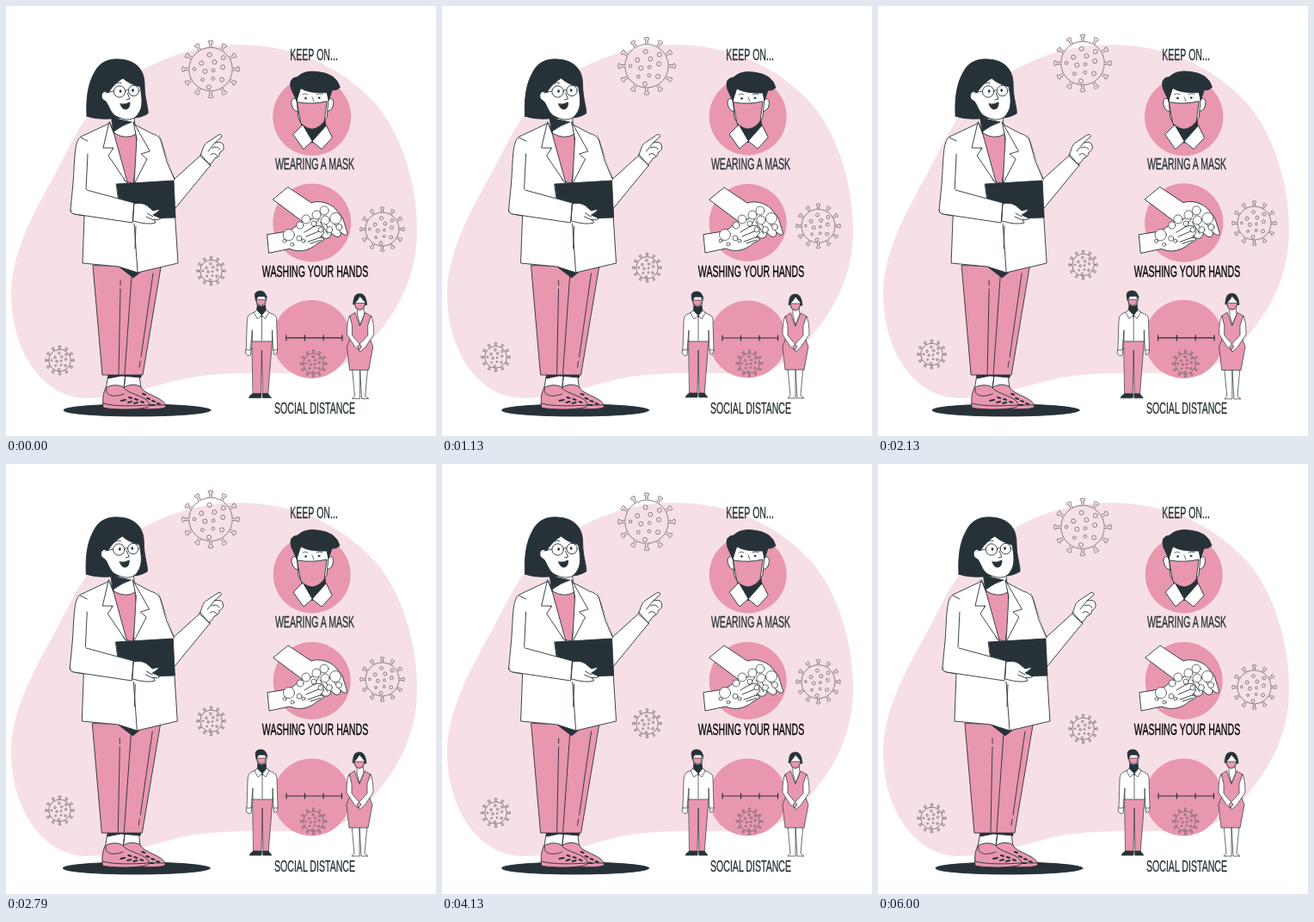
Write an HTML page that moves like this. It is 500 by 500 pixels and loops after 6040 ms.

```html
<!DOCTYPE html>
<html lang="en">
<head>
<meta charset="utf-8">
<title>Keep on</title>
<style>
html, body { margin: 0; width: 100%; height: 100%; overflow: hidden; background: #fff; }
svg { display: block; width: 100vw; height: 100vh; }
.art { stroke: #263238; stroke-width: .9; stroke-linejoin: round; stroke-linecap: round; fill: none; }
.w { fill: #fff; }
.p { fill: #e897ae; }
.d { fill: #263238; }
.disc { fill: #e897ae; stroke: none; }
.fine { stroke-width: .7; }
.virus { fill: none; stroke: #756b70; stroke-width: .85; }
.virus * { vector-effect: non-scaling-stroke; }
.beat { transform-box: fill-box; transform-origin: center; }
text { font: 18px "Liberation Sans", Arial, sans-serif; text-anchor: middle; stroke-width: .35; }
</style>
</head>
<body>
<svg viewBox="0 0 500 500">
<path fill="#f6e0e6" d="M270 45C332 45 388 68 430 114C462 152 478 210 478 262C478 318 452 358 428 386C404 420 378 428 320 427C270 426 235 427 200 435C160 445 130 456 92 456C42 455 6 400 6 335C6 285 35 235 59 192C80 152 92 122 127 95C170 62 220 45 270 45Z"/>

<g id="viruses"></g>

<g id="woman" class="art">
  <ellipse class="d" cx="152.500" cy="470" rx="85.500" ry="7"/>
  <!-- shoes and trousers -->
  <path class="w" d="M119 428L116 446L136 452L139 428ZM139 428L137 446L157 446L155 428Z"/>
  <path class="d" d="M119 429L119 433L134 430L157 432L157 429Z"/>
  <path class="p" d="M137 444C140 440 152 439 157 443C160 452 185 455 186 466C184 470 150 469 139 467Z"/>
  <path class="p" d="M116 444C122 440 131 440 136 443C142 452 165 453 167 464C168 470 123 470 113 467C112 457 113 450 116 444Z"/>
  <path d="M113 462C126 466 150 465 167 464M167 464L186 464M117 445C115 453 125 456 137 451"/>
  <path stroke-width="2" d="M134 459l5-1M142 461l4-1M149 462l4-1M143 455l3 1M150 457l3 1M157 460l3 1M164 456l3 1M170 459l3 1M176 462l3 1M159 451l3 1M168 464l4 0"/>
  <path class="p" d="M101 302L112 429H159L180 304Z"/>
  <path d="M146 315L138 428M133 319V325M133 329L131 428M171 311L157 408M156 413L155 420"/>
  <path class="d" d="M130 302L148 316L158 308V300Z"/>
  <!-- coat -->
  <path class="w" d="M178 151C184 165 188 184 196 201L227 173L238 185L197 235L184 230Z"/>
  <path class="w" stroke="none" d="M148 137L169 148L178 151L190 190L197 234L180 240L150 200Z"/>
  <path class="w" d="M196 202L190 206L196 235L200 299L153 310L131 303L89 299L91 244L80 242Q75 241 75 237L78 206C80 180 79 157 87 152L121 136L126 148L148 137"/>
  <path class="w" stroke="none" d="M148 137L169 148L178 151L196 202L190 230L130 210Z"/>
  <path d="M148 137L169 148Q177 150 180 156L187 181L196 202M149 253L153 309M95 172L93 214M87 153L95 157M151 256L150 282"/>
  <path class="p" d="M126 148L151 148L153 173L148 207L138 203L124 168Z"/>
  <path class="w" d="M123 129L126 148Q140 156 151 149L149 129Z"/>
  <path class="d" d="M123 130L146 135Q136 138 125 146Z"/>
  <path class="w" d="M120 135L113 165L125 165L119 174L142 208L126 150ZM148 135L152 154L149 207L164 178L157 172L167 169Z"/>
  <!-- pointing hand -->
  <path class="w" d="M226 174C229 167 229 161 235 158L247 150Q251 148 251 152L243 159Q253 157 253 163Q254 168 249 170Q248 176 243 177Q240 183 237 184Z"/>
  <path d="M235 169L243 159M240 165Q246 162 249 167M238 173Q243 169 246 175M226 172L238 186"/>
  <!-- folder and left hand -->
  <path class="d" d="M128.500 207L195 203L197 246L134 248Z"/>
  <path class="w" stroke="none" d="M76 238C80 230 84 220 93 213L149 229L148 252L80 242Q75 241 76 238Z"/>
  <path class="w" d="M149 230Q158 228 164 232L171 238L179 236Q177 240 171 243L180 247Q176 250 172 248L174 252Q165 255 148 250Z"/>
  <path d="M94 214L149 229L147 252L80 242Q75 241 75 237M164 241L171 245M163 245L172 249"/>
  <!-- head -->
  <path class="d" d="M94 128C93 108 95 91 103 77C109 65 120 61 132 62C151 63 161 74 161 91C161 108 166 119 165 125C160 128 154 130 148 130L121 131Q105 132 94 128Z"/>
  <path class="w" d="M112 108C109 101 115 97 119 101C124 93 129 88 136 84C144 91 151 92 156 94C158 105 160 117 154 125C148 135 136 133 126 127C120 121 119 114 116 111Z"/>
  <circle cx="132" cy="99.500" r="6.700"/><circle cx="148.500" cy="98.500" r="6.200"/>
  <path d="M125.300 99L116 101M138.700 98.500Q140.500 96.500 142.300 98M141 101L144 108L140 109M128 90Q131 88 134 89.500M147 89Q150 88 152 90"/>
  <ellipse class="d" cx="133" cy="99" rx=".8" ry="1.600"/><ellipse class="d" cx="147.500" cy="98" rx=".8" ry="1.600"/>
  <path class="d" d="M133 114Q139 115 144 112Q144 120 139 120Q135 120 133 114Z"/>
</g>

<g class="art beat">
  <circle class="disc" cx="355.700" cy="128.500" r="45"/>
  <path class="d" d="M344 133L371 133L372 143L356 159L344 143Z"/>
  <path class="w" d="M345 138L334 149L346 166L356 157ZM372 139L356 157L367 166L379 153Z"/>
  <path class="w" d="M337 108C331 106 331 114 334 119Q337 124 341 122ZM375 108C382 106 381 114 379 119Q375 124 371 122Z"/>
  <path class="w" d="M338 96L376 96L373 129Q367 142 356 143Q345 142 340 130Z"/>
  <path class="d" d="M338 110L332 97Q328 84 339 83Q347 75 362 77Q384 79 388 95Q384 99 379 98L375 110L373 101Q352 102 343 96Z"/>
  <path class="p" d="M339 112Q356 115 373 111L370 134Q364 142 356 143Q348 142 343 136Z"/>
  <path class="fine" d="M345 103Q348 101 351 103M361 103Q365 101 368 103M356 106L358 111"/>
  <circle class="d" cx="348.500" cy="107.500" r=".9"/><circle class="d" cx="364" cy="107" r=".9"/>
</g>

<g class="art beat">
  <circle class="disc" cx="355.700" cy="252" r="45"/>
  <path class="w" d="M311 225L328 211L355 229C364 226 375 229 382 235L391 246L396 262Q398 267 393 266L389 263Q389 270 383 268L378 264Q377 271 370 270L364 264L344 250Z"/>
  <path class="w" d="M304 266L306 287L330 282C341 287 353 284 362 276L369 272Q370 269 365 269L370 263Q369 260 363 262L367 256Q364 254 357 257L364 248Q363 244 357 247L344 252C338 254 333 261 327 262Z"/>
  <path d="M357 257L347 263M363 262L349 268M365 269L351 274M377 248L389 263M371 252L378 264M365 251L374 265M354 276L366 272"/>
  <g id="bubbles" class="w fine"></g>
</g>

<g class="art beat fine">
  <circle class="disc" cx="355.500" cy="387.500" r="45"/>
  <path stroke-width="1.200" d="M326 386H391M326 383v6M347.500 383v6M369 383v6M390.500 383v6"/>
  <g id="near"></g>
  <!-- man -->
  <path class="p" d="M287 389H310L305 453H299L298 400L297 453H288Z"/>
  <path class="d" d="M288 450L297 450V455H283Q284 452 288 450ZM299 450L305 450L309 455H299Z"/>
  <path class="w" d="M280 399L279 403Q281 408 285 406L286 398ZM311 398L312 405Q316 406 316 399Z"/>
  <path class="w" d="M292 355L284 359Q281 361 281 368L280 400H285L287 377V390H310L310 377L311 400H316L315 365Q315 360 311 359L303 355Z"/>
  <path class="d" d="M293 347L292 356L298 362L303 356L302 347Z"/>
  <path class="w" d="M292 354L289 357L293 364L298 360ZM303 354L298 360L302 364L306 357Z"/>
  <path d="M298 361V389"/>
  <path class="w" d="M291 338L304 338L302 348L297 350L293 348Z"/>
  <path class="d" d="M291 343L290 337Q290 332 297 332Q304 333 303 342L301 338L294 338Z"/>
  <path class="p" d="M292 342L302 342L301 347L297 349L293 347Z"/>
  <!-- woman -->
  <path class="w" d="M402 420L405 453L402 456H411V421ZM411 421L413 456H421L417 453L420 420Z"/>
  <path class="d" d="M403 347L404 341Q405 335 411 335Q418 335 419 348L413 349Z"/>
  <path class="w" d="M408 349V359L411 371L416 359L415 349Z"/>
  <path class="w" d="M405 346Q409 342 411 338Q415 343 417 345L415 352L411 354L407 352Z"/>
  <path class="p" d="M405 346L417 346L415 352L411 354L407 352Z"/>
  <path class="p" d="M405 357L399 361L400 386L396 396L399 423H421L426 396L422 386L424 361L417 357L411 372Z"/>
  <path class="w" d="M399 361Q396 366 396 382L405 396L410 400L413 396L402 383L402 372ZM424 361Q427 366 427 382L417 397L411 402L408 396L420 383L420 372Z"/>
</g>

<g id="labels"></g>
</svg>
<script>
const LOOP = 6040, STEP = 40, BEAT = LOOP / 4;
const get = id => document.getElementById(id);

function virusAt(x, y, size) {
  let parts = '<circle r="26"/>';
  for (let a = 0; a < 360; a += 30)
    parts += `<path fill="#f6e0e6" transform="rotate(${a})" d="M-1.300 -26V-31.500Q-3 -31.500 -3 -33T-1.300 -34.300H1.300Q3 -34.300 3 -33T1.300 -31.500V-26"/>`;
  for (let i = 0; i < 12; i++) {
    const a = i * 2.4 + .4, r = 6.4 * Math.sqrt(i + .3);
    parts += `<circle cx="${r * Math.cos(a)}" cy="${r * Math.sin(a)}" r="${i % 3 ? 2.6 : 1.9}"/>`;
  }
  return `<g class="virus" transform="translate(${x} ${y}) scale(${size})">${parts}</g>`;
}

get('viruses').innerHTML =
  virusAt(238, 73.5, .97) + virusAt(437.5, 259.5, .75) + virusAt(238.5, 308, .49) + virusAt(62.5, 412, .49);
get('near').innerHTML = virusAt(357.5, 415.5, .45).replaceAll('#f6e0e6', '#e897ae');

get('bubbles').innerHTML = [
  [329, 266, 6.5], [342, 255, 4], [349, 248, 5], [361, 243, 5], [370, 238, 5], [383, 247, 6.5],
  [371, 249, 5], [387, 257, 3.5], [376, 260, 3.5], [366, 260, 3], [358, 253, 3], [341, 270, 3],
  [333, 277, 2], [324, 273, 2], [346, 273, 2]
].map(([x, y, r]) => `<circle cx="${x}" cy="${y}" r="${r}"/>`).join('');

get('labels').innerHTML = [
  ['KEEP ON...', 358, 63], ['WEARING A MASK', 359, 190],
  ['WASHING YOUR HANDS', 359.5, 315, '#000'], ['SOCIAL DISTANCE', 359, 473.5]
].map(([s, x, y, ink = '#263238']) =>
  `<text transform="translate(${x} ${y}) scale(.588 1)" fill="${ink}" stroke="${ink}">${s}</text>`).join('');

// Eased value at p from [position, value] pairs
function keyed(p, keys) {
  const i = keys.findIndex(k => k[0] > p);
  const [a, from] = keys[i - 1], [b, to] = keys[i];
  const u = (p - a) / (b - a);
  return from + (to - from) * u * u * (3 - 2 * u);
}

const sway = [[0, 0], [.34, 2.7], [.685, -3.9], [1, 0]];
const pulse = [[0, 1], [.1, 1.1], [.3, 1], [.4, 1], [.5, 1.1], [.6, 1], [1, 1]];
const icons = document.querySelectorAll('.beat');

function draw(now) {
  const t = Math.floor(now % LOOP / STEP) * STEP;
  const lift = 10 * (1 - Math.abs(1 - 2 * t / LOOP));
  get('viruses').setAttribute('transform', `translate(0 ${-lift})`);
  get('woman').setAttribute('transform', `translate(${keyed(t * 2 / LOOP % 1, sway)} 0)`);
  const size = keyed((t + 30) / BEAT % 1, pulse);
  icons.forEach(icon => icon.style.transform = `scale(${size})`);
  requestAnimationFrame(() => draw(performance.now() - start));
}
const start = performance.now();
draw(0);
</script>
</body>
</html>
```
